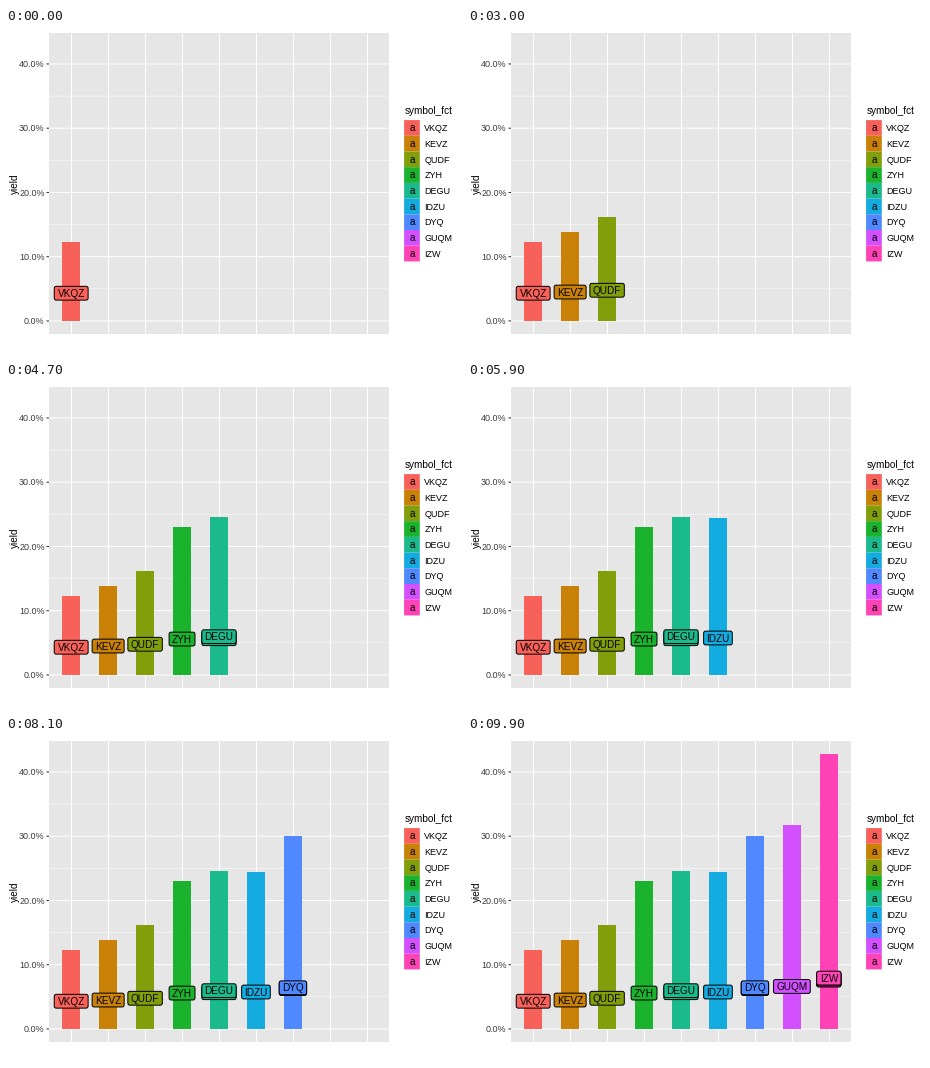
A matplotlib script for the animation above (10 s loop, 456x326 px).

```python
import matplotlib as mpl
import matplotlib.pyplot as plt
from matplotlib.animation import FuncAnimation
from matplotlib.patches import FancyBboxPatch, Rectangle
from matplotlib.textpath import TextPath

W, H, DPI = 456, 326, 64
PT = 72 / DPI                      # points per pixel
FRAMES, INTERVAL = 100, 100

LEFT, RIGHT, TOP, BOTTOM = 43, 383, 5, 306
STEP = (RIGHT - LEFT) / 9.2        # discrete axis, 0.6 units spare on each side
ZERO, PER_PCT = 292.95, 6.425
CAP = 0.36                         # half the cap height, in em
KEY = 15.7
SMALL, NORMAL = 9, 10              # text sizes in pixels

# name, yield in percent, fill
ROWS = [
    ("VKQZ", 12.25, (247, 97, 90)),
    ("KEVZ", 13.8, (202, 129, 8)),
    ("QUDF", 16.15, (130, 158, 10)),
    ("ZYH", 23.0, (27, 178, 46)),
    ("DEGU", 24.55, (27, 186, 140)),
    ("IDZU", 24.4, (20, 172, 224)),
    ("DYQ", 30.0, (80, 136, 255)),
    ("GUQM", 31.7, (211, 80, 255)),
    ("IZW", 42.75, (255, 66, 182)),
]
# labels with further copies behind, by vertical offset
STACKED = {4: (0.8, -1.2), 6: (0.8, 0), 8: (2.0, 1.0, 0)}

mpl.rcParams["font.family"] = "Liberation Sans"

fig = plt.figure(figsize=(W / DPI, H / DPI), dpi=DPI, facecolor="white")
ax = fig.add_axes([0, 0, 1, 1])
ax.set_xlim(0, W)
ax.set_ylim(H, 0)
ax.axis("off")


def xpos(i):
    return LEFT + (0.6 + i) * STEP


def ypos(pct):
    return ZERO - pct * PER_PCT


def rgb(color):
    return tuple(c / 255 for c in color)


def rect(x0, y0, x1, y1, color, z, snap=None):
    patch = Rectangle((x0, y0), x1 - x0, y1 - y0, fc=color, lw=0, zorder=z,
                      snap=snap)
    return ax.add_patch(patch)


def line(x0, y0, x1, y1, width, color="white", snap=None):
    ax.plot([x0, x1], [y0, y1], color=color, lw=width * PT, zorder=1,
            solid_capstyle="butt", snap=snap)


def text(x, y, s, size, color="black", ha="left", z=3):
    return ax.text(x, y, s, size=size * PT, color=color, ha=ha,
                   va="baseline", zorder=z)


def label(x, y, s, color, offsets):
    """Rounded box around a centred text, with optional copies behind it."""
    width = TextPath((0, 0), s, size=NORMAL).get_extents().width + 7
    height = 13.8
    parts = []
    for k, dy in enumerate(offsets):
        box = FancyBboxPatch(
            (x - width / 2, y + dy - height / 2), width, height,
            boxstyle="round,pad=0,rounding_size=2",
            fc=color, ec="black", lw=PT, zorder=5 + 0.1 * k)
        parts.append(ax.add_patch(box))
    baseline = y + offsets[-1] + NORMAL * CAP
    parts.append(text(x, baseline, s, NORMAL, ha="center", z=6))
    return parts


def draw_panel():
    rect(LEFT, TOP, RIGHT, BOTTOM, "#e6e6e6", 0)
    for pct in range(5, 45, 10):
        line(LEFT, ypos(pct), RIGHT, ypos(pct), 0.5, snap=False)
    for pct in range(0, 50, 10):
        y = ypos(pct)
        line(LEFT, y, RIGHT, y, 1, snap=False)
        line(LEFT - 2.5, y, LEFT, y, 1, "#2a2a2a", snap=False)
        text(LEFT - 4.3, y + SMALL * CAP, f"{pct:.1f}%", SMALL, "#3c3c3c",
             "right")
    for i in range(len(ROWS)):
        line(xpos(i), TOP, xpos(i), BOTTOM, 1)
    ax.text(14.4, (TOP + BOTTOM) / 2, "yield", size=NORMAL * PT, rotation=90,
            ha="right", va="center")


def draw_legend():
    x, y0 = 398.1, 92.1
    text(x + 0.3, 86, "symbol_fct", NORMAL)
    for i, (name, _, color) in enumerate(ROWS):
        y = y0 + i * KEY
        rect(x, y, x + KEY, y + KEY, rgb(color), 1, snap=False)
        text(x + KEY / 2, y + KEY / 2 + 3.2, "a", NORMAL, ha="center")
        text(x + KEY + 4.6, y + KEY / 2 + SMALL * CAP, name, SMALL)


def make_bar(i):
    name, pct, color = ROWS[i]
    x, half = xpos(i), STEP / 4
    bar = rect(x - half, ypos(pct), x + half, ZERO, rgb(color), 2)
    y = ypos(2.87 + 0.118 * pct)
    return [bar] + label(x, y, name, rgb(color), STACKED.get(i, (0,)))


draw_panel()
draw_legend()
bars = [make_bar(i) for i in range(len(ROWS))]


def update(n):
    shown = 1 + (n + 1) // 12      # a new bar pops in every 12 frames
    for i, parts in enumerate(bars):
        for part in parts:
            part.set_visible(i < shown)
    return [part for parts in bars for part in parts]


anim = FuncAnimation(fig, update, frames=FRAMES, interval=INTERVAL,
                     repeat=True, repeat_delay=0, blit=False)
plt.show()
```
